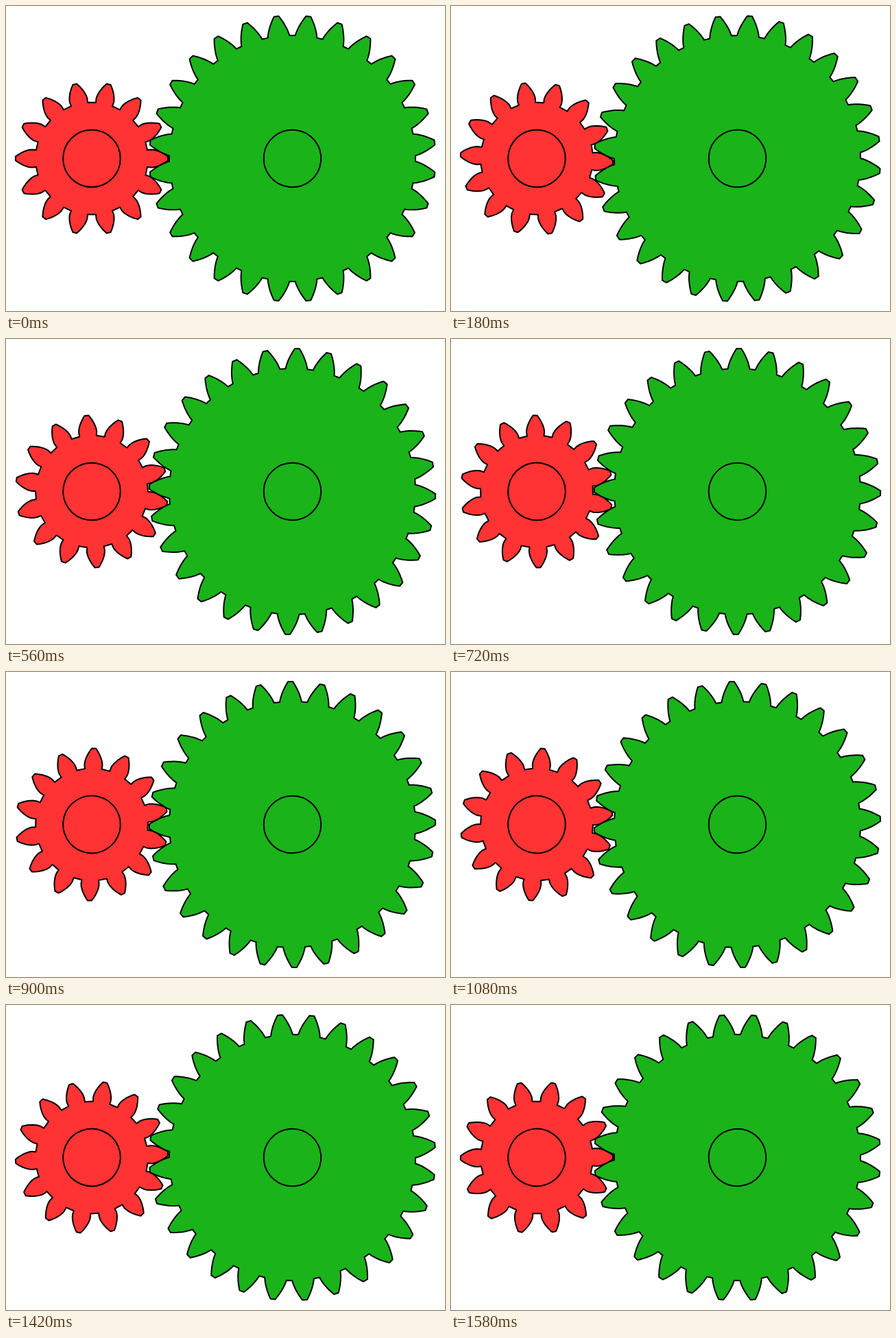
Write an HTML page with a canvas that moves like this. It is 640 px wide and 445 px high and loops after 1600 ms.

```html
<!DOCTYPE html>
<html lang="en">
<head>
<meta charset="utf-8">
<title>Meshing gears</title>
<style>
  html, body { margin: 0; width: 100%; height: 100%; overflow: hidden; background: #fff; }
  canvas { display: block; }
</style>
</head>
<body>
<canvas id="stage" width="640" height="445"></canvas>
<script>
const ctx = document.getElementById('stage').getContext('2d');
const LOOP = 1600, STEP = 20;
const PRESSURE = 27 * Math.PI / 180;
const ADDENDUM = 13.6, DEDENDUM = 15.5, HUB = 41.8;
const FLANK_STEPS = 10;

const involute = a => Math.tan(a) - a;

// Involute gear outline with one tooth centred on angle 0.
function gearPath(teeth, pitch) {
  const base = pitch * Math.cos(PRESSURE);
  const root = pitch - DEDENDUM, tip = pitch + ADDENDUM;
  const halfBase = Math.PI / (2 * teeth) + involute(PRESSURE);
  const halfAngle = r => halfBase - (r > base ? involute(Math.acos(base / r)) : 0);
  const path = new Path2D();
  const point = (r, a) => path.lineTo(r * Math.cos(a), r * Math.sin(a));

  for (let i = 0; i < teeth; i++) {
    const mid = i * 2 * Math.PI / teeth;
    const flank = (k, side) => {
      const r = root + (tip - root) * k / FLANK_STEPS;
      point(r, mid + side * halfAngle(r));
    };
    for (let k = 0; k <= FLANK_STEPS; k++) flank(k, -1);
    point(tip, mid);
    for (let k = FLANK_STEPS; k >= 0; k--) flank(k, 1);
  }
  path.closePath();
  return path;
}

function makeGear(x, teeth, pitch, color, phase, direction) {
  const outline = gearPath(teeth, pitch);
  const hub = new Path2D();
  hub.arc(0, 0, HUB, 0, 2 * Math.PI);
  const toothAngle = 2 * Math.PI / teeth;

  return progress => {
    ctx.save();
    ctx.translate(x, 222.5);
    ctx.rotate(toothAngle * (phase + direction * progress));
    ctx.fillStyle = color;
    ctx.fill(outline);
    ctx.stroke(outline);
    ctx.stroke(hub);
    ctx.restore();
  };
}

const gears = [
  makeGear(125, 14, 97.5, '#ff3333', 0, 1),
  makeGear(417.5, 28, 195, '#1ab31a', 0.5, -1)
];

ctx.lineWidth = 2;
ctx.lineJoin = 'round';
ctx.strokeStyle = '#000';

function draw() {
  const time = Math.floor(performance.now() % LOOP / STEP) * STEP;
  ctx.clearRect(0, 0, 640, 445);
  for (const drawGear of gears) drawGear(time / LOOP);
  requestAnimationFrame(draw);
}
draw();
</script>
</body>
</html>
```
